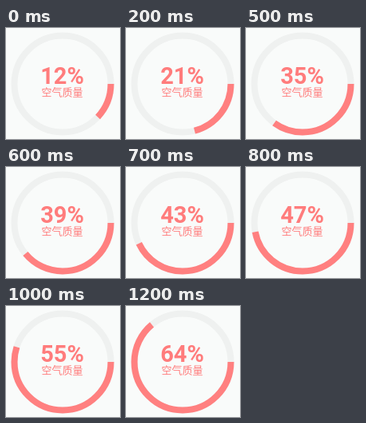
Recreate the animation shown at these times as an HTML page. Size 143 by 139 pixels, loop 1.7 s.

```html
<!DOCTYPE html>
<html lang="zh-CN">
<head>
<meta charset="utf-8">
<title>空气质量</title>
<style>
html, body { margin: 0; width: 100%; height: 100%; overflow: hidden; background: #f9fbfa; }
svg { display: block; width: 143px; height: 139px; }
circle { fill: none; stroke-width: 8; }
.track { stroke: #eff1f0; }
.arc { stroke: #ff8080; }
text { text-anchor: middle; fill: #ff7c7c; }
.value { font: 700 29px Roboto, sans-serif; }
.label { font: 400 13px "Noto Sans CJK SC", "Noto Sans CJK", sans-serif; }
</style>
</head>
<body>
<svg viewBox="0 0 143 139">
  <circle class="track" cx="71" cy="70" r="60.5"/>
  <circle class="arc" cx="71" cy="70" r="60.5" pathLength="100"/>
  <text class="value" x="70.5" y="70"></text>
  <text class="label" x="70.5" y="85">空气质量</text>
</svg>
<script>
const LOOP = 1700;
const STEP = 100;
const levels = [12, 17, 21, 26, 30, 35, 39, 43, 47, 51, 55, 60, 64];
const arc = document.querySelector('.arc');
const value = document.querySelector('.value');

function draw(ms) {
  const step = Math.min(Math.floor(ms % LOOP / STEP), levels.length - 1);
  const level = levels[step];
  arc.setAttribute('stroke-dasharray', `${level} 100`);
  value.textContent = `${level}%`;
}

const start = performance.now();
function tick() {
  draw(performance.now() - start);
  requestAnimationFrame(tick);
}
tick();
</script>
</body>
</html>
```
